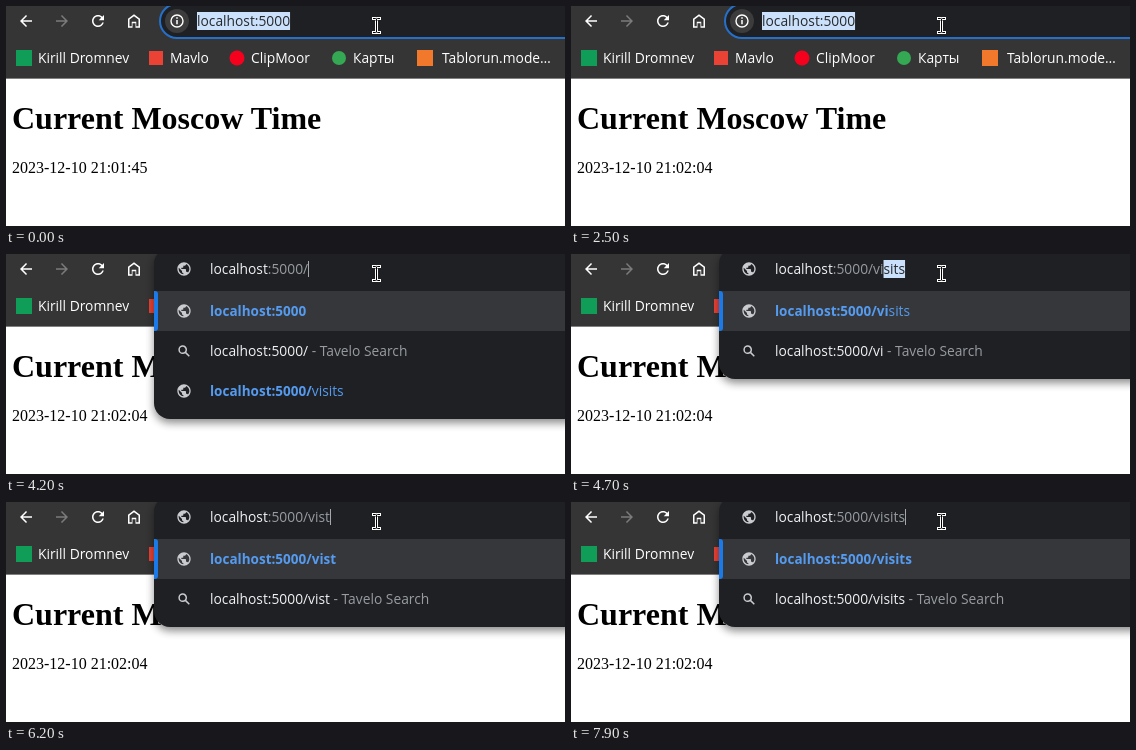
An HTML page for the animation above (8000 ms loop, 559x220 px).

```html
<!DOCTYPE html>
<html lang="en">
<head>
<meta charset="utf-8">
<title>Address bar</title>
<style>
html, body { margin: 0; width: 100%; height: 100%; overflow: hidden; background: #fff; }
svg { display: block; }
text { white-space: pre; }
.ui { font: 13.8px "Open Sans", "Noto Sans", sans-serif; }
.b { font-weight: 700; font-size: 13.5px; }
.page { font-family: "Liberation Serif", serif; }
</style>
</head>
<body>
<svg id="stage" width="559" height="220" viewBox="0 0 559 220">
  <defs>
    <path id="globe" transform="scale(.667) translate(-12 -12)" fill="#c9cbce" d="M12 2C6.48 2 2 6.48 2 12s4.48 10 10 10 10-4.48 10-10S17.52 2 12 2zm-1 17.93c-3.95-.49-7-3.85-7-7.93 0-.62.08-1.21.21-1.79L9 15v1c0 1.1.9 2 2 2v1.93zm6.9-2.54c-.26-.81-1-1.39-1.9-1.39h-1v-3c0-.55-.45-1-1-1H8v-2h2c.55 0 1-.45 1-1V7h2c1.1 0 2-.9 2-2v-.41c2.93 1.19 5 4.06 5 7.41 0 2.08-.8 3.97-2.1 5.39z"/>
    <path id="arrow" transform="scale(.75) translate(-12 -12)" d="M20 11H7.83l5.59-5.59L12 4l-8 8 8 8 1.41-1.41L7.83 13H20z"/>
    <g id="lens" fill="none" stroke="#c9cbce" stroke-width="1.5">
      <circle cx="-1.3" cy="-1.3" r="3.6"/><path d="M1.4 1.4L5.3 5.3"/>
    </g>
    <path id="beam" d="M367.5 12.5h2l1 1 1-1h2M370.5 13v13M367.5 26.5h2l1-1 1 1h2"/>
    <filter id="shade" x="-10%" y="-20%" width="120%" height="150%"><feGaussianBlur stdDeviation="4.5"/></filter>
  </defs>

  <rect width="559" height="220" fill="#fff"/>
  <rect width="559" height="72" fill="#353535"/>
  <rect y="72" width="559" height="1" fill="#808080"/>
  <g fill="#fff">
    <use href="#arrow" transform="translate(20 15)"/>
    <use href="#arrow" transform="translate(56 15) scale(-1 1)" fill="#7b7b7b"/>
    <path id="reload" transform="translate(92 15) scale(.75) translate(-12 -12)" d="M17.65 6.35C16.2 4.9 14.21 4 12 4c-4.42 0-7.99 3.58-7.99 8s3.57 8 7.99 8c3.73 0 6.84-2.55 7.73-6h-2.08c-.82 2.33-3.04 4-5.65 4-3.31 0-6-2.69-6-6s2.69-6 6-6c1.66 0 3.14.69 4.22 1.78L13 11h7V4l-2.35 2.35z"/>
    <path id="stop" d="M87.5 10.5l9 9m0-9l-9 9" stroke="#fff" stroke-width="1.7"/>
    <path transform="translate(128 15) scale(.75) translate(-12 -12)" d="M6 19h3v-6h6v6h3v-9l-6-4.5L6 10v9zm-2 2V9l8-6 8 6v12h-6v-6h-4v6H4z"/>
  </g>

  <g class="ui" fill="#fff">
    <rect x="10" y="44" width="16" height="16" fill="#0f9d58"/>
    <text x="32" y="57">Kirill Dromnev</text>
    <rect x="143" y="45" width="14" height="14" fill="#ea4335"/>
    <text x="164" y="57">Mavlo</text>
    <circle cx="231" cy="52" r="7.5" fill="#f5001d"/>
    <text x="245" y="57">ClipMoor</text>
    <circle cx="333" cy="52" r="7" fill="#34a853"/>
    <text x="347" y="57">Карты</text>
    <rect x="411" y="44" width="16" height="16" fill="#f2792b"/>
    <text x="436" y="57">Tablorun.mode…</text>
  </g>

  <g class="page" fill="#000">
    <text x="6" y="123" font-size="32" font-weight="700">Current Moscow Time</text>
    <text id="clock" x="6" y="167" font-size="16"></text>
  </g>

  <g id="pill">
    <rect id="field" x="154" y="-2" width="500" height="34" rx="17" stroke-width="2"/>
    <circle cx="171" cy="15" r="12" fill="#3c3c3c"/>
    <circle cx="171" cy="15" r="6" fill="none" stroke="#fff" stroke-width="1.4"/>
    <path d="M171 14v4.2M171 11.3v1.5" stroke="#fff" stroke-width="1.5"/>
  </g>

  <g id="menu">
    <rect id="shadow" x="148" y="-2" width="500" rx="16" fill="#000" opacity=".45" filter="url(#shade)"/>
    <rect id="panel" x="148" y="-6" width="500" rx="16" fill="#1f2023"/>
    <rect x="148" y="37" width="411" height="40" fill="#36373a"/>
    <path d="M148 37h1a3 3 0 0 1 3 3v34a3 3 0 0 1-3 3h-1z" fill="#1a7ae8"/>
    <use href="#globe" transform="translate(178 15)"/>
    <use href="#globe" transform="translate(178 57)"/>
    <use href="#lens" transform="translate(178 97)"/>
    <use id="globe3" href="#globe" transform="translate(178 137)"/>
  </g>

  <g id="words" class="ui"></g>

  <g fill="none" stroke-linecap="square">
    <use href="#beam" stroke="#fff" stroke-width="3"/>
    <use href="#beam" stroke="#000" stroke-width="1"/>
  </g>
</svg>
<script>
const LOOP = 8000, HOST = "localhost", PORT = ":5000", SITE = HOST + PORT;
const WHITE = "#f1f2f4", GREY = "#989ca2", BLUE = "#559bf0", DARK = "#26282c";
const $ = id => document.getElementById(id);

// Each state: start time, then what differs from an idle bar.
// typed: path entered, rest: selected completion, hit: [bold, plain] of the first row, third: same for the last row
const plain = { typed: "", rest: "" };
const open = (typed, rest, caret, third, hit) =>
  ({ menu: true, typed, rest, caret, third, hit: hit || [typed, rest] });
const old = ["/", "visits"];
const STATES = [
  [0, { ...plain, focus: true, all: true }],
  [1300, { ...plain, loading: true }],
  [1400, plain],
  [2400, { ...plain, focus: true }],
  [2500, { ...plain, focus: true, all: true }],
  [3900, { ...plain, focus: true, caret: true }],
  [4100, open("/", "", true, null, ["", ""])],
  [4200, open("/", "", true, old, ["", ""])],
  [4500, open("/v", "isits", false, old)],
  [4700, open("/vi", "sits", false)],
  [4800, open("/vis", "its", false)],
  [5000, open("/vist", "", true)],
  [5400, open("/vists", "", true)],
  [5900, open("/vists", "", false)],
  [6200, open("/vist", "", true)],
  [6400, open("/vis", "", true, ["/vis", "its"])],
  [6800, open("/vis", "", false, ["/vis", "its"])],
  [7100, open("/visi", "ts", false, ["/vis", ""])],
  [7300, open("/visit", "s", false)],
  [7900, open("/visits", "", true)]
];

function make(tag, attrs, parent) {
  const el = document.createElementNS("http://www.w3.org/2000/svg", tag);
  for (const k in attrs) el.setAttribute(k, attrs[k]);
  parent.appendChild(el);
  return el;
}

// Writes runs of [text, colour, bold] on one line.
function line(x, y, runs) {
  const el = make("text", { x, y }, $("words"));
  for (const [str, fill, bold] of runs)
    if (str) make("tspan", { fill, class: bold ? "b" : "" }, el).textContent = str;
  return el;
}

function address(s) {
  const x = s.menu ? 204 : 191;
  const runs = s.all ? [[SITE, DARK]]
    : [[HOST, WHITE], [PORT + s.typed, GREY], [s.rest, DARK]];
  const el = line(x, 20, runs);
  const end = x + el.getComputedTextLength();
  if (s.all || s.rest) {
    const from = s.all ? x : end - el.lastChild.getComputedTextLength();
    const box = make("rect", { x: from, y: 6, width: end - from, height: 18, fill: "#cbe1fb" }, $("words"));
    $("words").insertBefore(box, el);
  }
  if (s.caret)
    make("rect", { x: Math.round(end), y: 7, width: 1, height: 16, fill: "#a4a7ab" }, $("words"));
}

const match = (y, [bold, rest]) => line(204, y, [[SITE + bold, BLUE, true], [rest, BLUE]]);
const show = (id, on) => $(id).setAttribute("display", on ? "inline" : "none");

function draw(t) {
  let i = STATES.length - 1;
  while (STATES[i][0] > t) i--;
  if (i === draw.last) return;
  draw.last = i;
  const s = STATES[i][1];

  $("words").replaceChildren();
  $("clock").textContent = "2023-12-10 " + (t < 1400 ? "21:01:45" : "21:02:04");
  show("reload", !s.loading);
  show("stop", s.loading);
  show("pill", !s.menu);
  show("menu", s.menu);
  $("field").setAttribute("fill", s.focus ? "#1f2023" : "#191919");
  $("field").setAttribute("stroke", s.focus ? "#2470cb" : "none");

  address(s);
  if (!s.menu) return;
  const bottom = s.third ? 165 : 125;
  $("panel").setAttribute("height", bottom + 6);
  $("shadow").setAttribute("height", bottom + 6);
  show("globe3", s.third);
  match(62, s.hit);
  line(204, 102, [[SITE + s.typed, WHITE], [" - Tavelo Search", GREY]]);
  if (s.third) match(142, s.third);
}

const start = performance.now();
function tick() {
  draw((performance.now() - start) % LOOP);
  requestAnimationFrame(tick);
}
tick();
</script>
</body>
</html>
```
